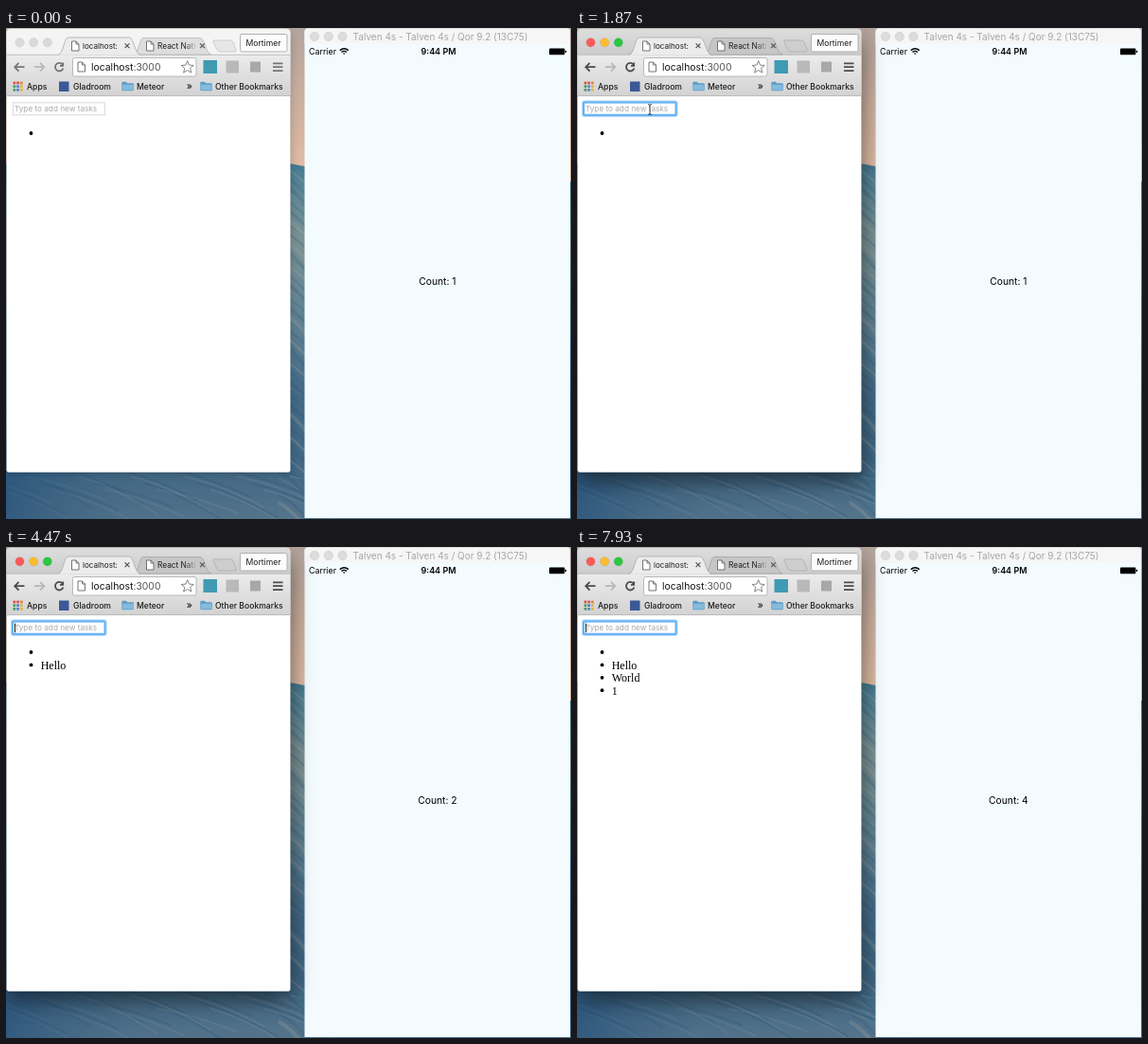
An HTML page for the animation above (8000 ms loop, 597 px wide and 518 px high).

```html
<!DOCTYPE html>
<html lang="en">
<head>
<meta charset="utf-8">
<title>Tasks and counter</title>
<style>
html, body { margin: 0; width: 100%; height: 100%; overflow: hidden; }
svg { display: block; width: 597px; height: 518px; font: 8.6px Inter, Roboto, sans-serif; }
.mark { font-weight: 500; fill: #1c1c1c; }
.list { font: 12px "Liberation Serif", serif; }
.line { fill: none; stroke: #757575; stroke-width: 1.8; }
.strip { fill: #f4f4f4; }
.tab { fill: #dedede; stroke: #b9b9b9; stroke-width: .8; }
.new { fill: #e6e6e6; stroke: #c6c6c6; stroke-width: .8; }
.active .line { stroke: #4c4c4c; }
.active .strip { fill: url(#strip); }
.active .tab { fill: #c6c6c6; stroke: #a5a5a5; }
.active .new { fill: #cecece; stroke: #adadad; }
</style>
</head>
<body>
<svg id="stage" viewBox="0 0 597 518">
<defs>
  <linearGradient id="sky" x2="0" y2="1">
    <stop stop-color="#b3a49c"/><stop offset=".5" stop-color="#cdb09f"/><stop offset="1" stop-color="#e4bea4"/>
  </linearGradient>
  <linearGradient id="sea" x2="0" y2="1">
    <stop stop-color="#457b92"/><stop offset=".1" stop-color="#648a96"/><stop offset=".22" stop-color="#7b9193"/>
    <stop offset=".36" stop-color="#698894"/><stop offset=".5" stop-color="#587b8f"/><stop offset=".66" stop-color="#426985"/>
    <stop offset=".85" stop-color="#416784"/><stop offset="1" stop-color="#54748b"/>
  </linearGradient>
  <linearGradient id="deep">
    <stop stop-color="#24507a" stop-opacity=".7"/><stop offset=".45" stop-color="#3a617f" stop-opacity=".15"/>
    <stop offset="1" stop-color="#3a617f" stop-opacity="0"/>
  </linearGradient>
  <linearGradient id="strip" x2="0" y2="1"><stop stop-color="#dedede"/><stop offset="1" stop-color="#cbcbcb"/></linearGradient>
  <linearGradient id="bar" x2="0" y2="1"><stop stop-color="#ececec"/><stop offset="1" stop-color="#d2d2d2"/></linearGradient>
  <linearGradient id="fade" gradientUnits="userSpaceOnUse" x1="188" x2="203"><stop stop-color="#1c1c1c"/><stop offset="1" stop-color="#1c1c1c" stop-opacity="0"/></linearGradient>
  <filter id="soft" x="-30%" y="-30%" width="160%" height="160%"><feGaussianBlur stdDeviation="5"/></filter>
  <filter id="wide" x="-30%" y="-30%" width="160%" height="160%"><feGaussianBlur stdDeviation="12"/></filter>
  <path id="outline" d="M.5 466V5Q.5 .7 5 .7H296Q300.5 .7 300.5 5V466Q300.5 468.7 298 468.7H3Q.5 468.7 .5 466Z"/>
  <clipPath id="frame"><use href="#outline"/></clipPath>
  <path id="water" d="M0 143H300L316 146 597 162V518H0Z"/>
  <clipPath id="wet"><use href="#water"/></clipPath>
  <g id="page"><path d="M.5.5H5L8 3.5V10.5H.5Z" fill="#fff" stroke="#666" stroke-width=".9"/><path d="M5 .5V3.5H8" fill="none" stroke="#666" stroke-width=".9"/></g>
  <g id="folder"><path d="M0 1.5Q0 .5 1 .5H4.5L6 2H11.5Q12.5 2 12.5 3V9Q12.5 10 11.5 10H1Q0 10 0 9Z" fill="#5d9cc6"/><path d="M.6 3.6H12V9.4H.6Z" fill="#86bbdc"/></g>
  <path id="cross" d="M-2.4-2.4 2.4 2.4M2.4-2.4-2.4 2.4" stroke="#555" stroke-width="1.2"/>
</defs>

<!-- desktop -->
<rect width="597" height="163" fill="url(#sky)"/>
<use href="#water" fill="url(#sea)"/>
<g id="waves" clip-path="url(#wet)" fill="none"></g>
<rect y="440" width="300" height="78" fill="url(#deep)"/>

<!-- simulator -->
<path d="M315.5 517V4Q315.5 .5 319 .5H593Q596 .5 596 4V517Z" fill="#f3fbff"/>
<path d="M315.5 16.5V4Q315.5 .5 319 .5H593Q596 .5 596 4V16.5Z" fill="#f6f6f6"/>
<g fill="#dcdcdc" stroke="#cdcdcd" stroke-width=".6"><circle cx="326" cy="9" r="4.7"/><circle cx="340.8" cy="9" r="4.7"/><circle cx="355.5" cy="9" r="4.7"/></g>
<text x="459" y="12.7" font-size="10" text-anchor="middle" fill="#a6a6a6">Talven 4s - Talven 4s / Qor 9.2 (13C75)</text>
<text x="320" y="28" font-size="8.9">Carrier</text>
<g fill="none" stroke="#000" stroke-width="1.4"><path d="M352.8 23.6Q357.2 19.8 361.8 23.6M354.5 25.5Q357.2 23.3 360 25.5"/><path d="M355.7 26.5H358.7L357.2 28Z" fill="#000" stroke="none"/></g>
<text x="457" y="28" font-size="9" font-weight="600" text-anchor="middle">9:44 PM</text>
<rect x="574" y="21.5" width="16.4" height="6.8" rx="1"/><rect x="590.8" y="23.7" width="1.3" height="2.4" rx=".6"/>
<text id="count" x="455.9" y="271" font-size="10.3" text-anchor="middle"></text>

<!-- browser -->
<rect id="shadow" x="1" width="299" height="464" rx="4"/>
<g clip-path="url(#frame)">
  <rect width="301" height="469" fill="#fff"/>
  <rect class="strip" width="301" height="29"/>
  <rect y="28" width="301" height="44" fill="url(#bar)"/>
  <path d="M0 28.3H301M0 71.6H301" stroke="#b4b4b4" stroke-width=".8"/>
  <path class="tab" d="M136 28C140 27 141 10.5 145 10.5H205C210 10.5 211 27 217 28Z"/>
  <path class="new" d="M219 13H237Q239 13 240 15L243 23Q243.5 25 242 25H226Q224 25 223 23L219 15Z"/>
  <path d="M55 28.8C61 27 61 10 66 10H130C135 10 136 27 142 28.8Z" fill="#ececec"/>
  <path d="M55 28.3C61 27 61 10 66 10H130C135 10 136 27 142 28.3" fill="none" stroke="#aaa" stroke-width=".8"/>
  <use href="#page" x="69" y="13.5"/><use href="#page" x="148" y="13.5"/>
  <text x="81" y="22" font-size="8.1" fill="#1c1c1c">localhost:</text>
  <text x="160" y="22" font-size="8.3" fill="url(#fade)">React Nati</text>
  <use href="#cross" x="128" y="18.8"/><use href="#cross" x="207.5" y="18.8"/>
  <rect x="247.5" y="6.5" width="49.5" height="18.5" rx="1.5" fill="#fcfcfc" stroke="#aaa" stroke-width=".9"/>
  <text x="272" y="18.8" text-anchor="middle" fill="#1c1c1c">Mortimer</text>
  <g id="lights" stroke-width=".6"><circle cx="14.5" cy="15.3" r="4.6"/><circle cx="29.2" cy="15.3" r="4.6"/><circle cx="43.8" cy="15.3" r="4.6"/></g>

  <path class="line" d="M19.5 41.2H9.5M13.5 36.8 9.2 41.2 13.5 45.6"/>
  <path d="M30 41.2H40M36 36.8 40.3 41.2 36 45.6" fill="none" stroke="#b8b8b8" stroke-width="1.8"/>
  <path class="line" d="M59.5 38.3A4.3 4.3 0 1 0 60.4 42.5M60.2 36.5V39.8H57"/>
  <rect x="70.5" y="31.5" width="130.5" height="19.5" rx="2" fill="#fff" stroke="#b3b3b3" stroke-width=".9"/>
  <use href="#page" x="75.5" y="35.5"/>
  <text x="90" y="45" font-size="10.4" fill="#111">localhost<tspan fill="#555">:3000</tspan></text>
  <path d="M191.7 34.7 193.5 39.1 198.2 39.5 194.6 42.5 195.8 47.1 191.7 44.6 187.6 47.1 188.8 42.5 185.2 39.5 189.9 39.1Z" fill="#fff" stroke="#777" stroke-width=".9"/>
  <rect x="208.5" y="34" width="14.5" height="14" fill="#3f9ab2"/>
  <rect x="232.5" y="34.5" width="13.5" height="13" fill="#b9b9b9"/>
  <rect x="258" y="35.5" width="11" height="11" fill="#a8a8a8"/>
  <path class="line" d="M282 37.3H292.5M282 41.2H292.5M282 45.1H292.5"/>

  <g id="apps"></g>
  <g class="mark"><text x="22" y="64.6">Apps</text><text x="71" y="64.6">Gladroom</text><text x="138" y="64.6">Meteor</text>
  <text x="190.8" y="64.6" font-size="10">»</text><text x="221" y="64.6">Other Bookmarks</text></g>
  <rect x="56" y="56.5" width="10.5" height="10.5" fill="#3b5998"/>
  <use href="#folder" x="122.3" y="56.2"/><use href="#folder" x="205.3" y="56.2"/>

  <rect x="7.3" y="78.8" width="97" height="13" fill="#fff" stroke="#d4d4d4" stroke-width=".9"/>
  <g id="ring" fill="none" stroke="#5fb0f6"><rect x="6.6" y="78" width="98.4" height="14.2" rx="1.5" stroke-width="3.4" opacity=".45"/><rect x="6.9" y="78.3" width="97.8" height="13.6" rx="1" stroke-width="1.8"/></g>
  <text id="hint" x="9" y="88.4" font-size="8.2" fill="#a9a9a9">Type to add new tasks</text>
  <text id="typed" x="9" y="88.6"></text>
  <rect id="caret" y="80.6" width=".9" height="9.6"/>
  <g id="list" class="list"></g>
</g>
<use href="#outline" fill="none" stroke="#000" stroke-opacity=".1" stroke-width=".5"/>

<!-- pointer -->
<circle id="ripple" cx="77.2" cy="85.7" r="17" fill="none" stroke="#000" stroke-width="1.5"/>
<path id="arrow" d="M0 0V10.2L2.4 8 4 11.8 5.8 11 4.2 7.4H7.4Z" stroke="#fff" stroke-width=".8"/>
<path id="beam" d="M75 80.5Q77 80.5 77 82V90Q77 91.5 75 91.5M79 80.5Q77 80.5 77 82M77 90Q77 91.5 79 91.5" fill="none" stroke="#333" stroke-width=".9"/>
</svg>
<script>
const $ = id => document.getElementById(id);
const show = (id, on) => $(id).style.display = on ? "" : "none";
const set = (el, attrs) => { for (const k in attrs) el.setAttribute(k, attrs[k]); };

const LOOP = 8000, ACTIVE = 1130, FOCUS = 1260;
const lightColors = ["#fc5b57", "#fdbc2f", "#2ac840"];
const tasks = ["", "Hello", "World", "1"];
const enters = [0, 4000, 6270, 7670];
// [time, content of the input]
const keys = [
  [FOCUS, ""], [2690, "H"], [2870, "He"], [3000, "Hel"], [3130, "Hell"], [3270, "Hello"], [4000, ""],
  [5400, "W"], [5600, "Wo"], [5730, "Wor"], [5870, "Worl"], [6000, "World"], [6270, ""],
  [7400, "1"], [7670, ""]
];

// streaks of the wave: steep beside the window, flatter below it
let waves = "";
const streak = (x, y, w, h, color, width) =>
  waves += `<path d="M${x} ${y}q${w * .45} ${h * .25} ${w} ${h}" stroke="${color}" stroke-width="${width}" opacity=".25"/>`;
for (let i = 0; i < 44; i++)
  streak(288, 135 + i * 8.5, 36, 24 + i % 4 * 4, ["#2c5878", "#a9a99f", "#2f6480"][i % 3], 1 + i % 4);
for (let i = 0; i < 26; i++)
  streak(i * 14 - 50, 466 + i % 4 * 7, 85, 25 + i % 5 * 4, i % 2 ? "#7f95a2" : "#2b506f", 2);
$("waves").innerHTML = waves;

const appColors = ["#dd5145", "#dd5145", "#e0813e", "#4a9d5b", "#4a84d8", "#e8b03a", "#4a9d5b", "#4a84d8", "#e8b03a"];
$("apps").innerHTML = appColors.map((c, i) =>
  `<rect x="${7.5 + i % 3 * 3.7}" y="${56.6 + (i / 3 | 0) * 3.7}" width="2.7" height="2.7" fill="${c}"/>`).join("");
$("list").innerHTML = tasks.map((task, i) =>
  `<g><circle cx="26.5" cy="${111 + i * 13.4}" r="1.9"/><text x="36.7" y="${115.3 + i * 13.4}">${task}</text></g>`).join("");

function draw(t) {
  const active = t >= ACTIVE, focused = t >= FOCUS;
  $("stage").classList.toggle("active", active);
  set($("shadow"), active
    ? { y: 13, filter: "url(#wide)", opacity: .55 }
    : { y: 5, filter: "url(#soft)", opacity: .25 });
  [...$("lights").children].forEach((dot, i) => set(dot, {
    fill: active ? lightColors[i] : "#dadada", stroke: active ? "#0002" : "#cdcdcd"
  }));

  const count = enters.filter(e => t >= e).length;
  [...$("list").children].forEach((row, i) => row.style.display = i < count ? "" : "none");
  $("count").textContent = "Count: " + count;

  const [since, value] = keys.filter(k => t >= k[0]).pop() || [0, ""];
  $("typed").textContent = value;
  show("hint", !value);
  show("ring", focused);
  const width = value ? $("typed").getComputedTextLength() : 0;
  set($("caret"), { x: 9 + width });
  show("caret", focused && (t - since) % 1000 < 500);

  const p = Math.min(1, Math.max(0, (t - 450) / 550)), left = (1 - p) ** 3;
  set($("arrow"), { transform: `translate(${77 + 525 * left} ${86 + 180 * left})` });
  show("arrow", t > 450 && !focused);
  show("beam", focused && t < keys[1][0]);
  show("ripple", t >= ACTIVE && t < 1400);
}

function tick() {
  draw(performance.now() % LOOP);
  requestAnimationFrame(tick);
}
tick();
</script>
</body>
</html>
```
